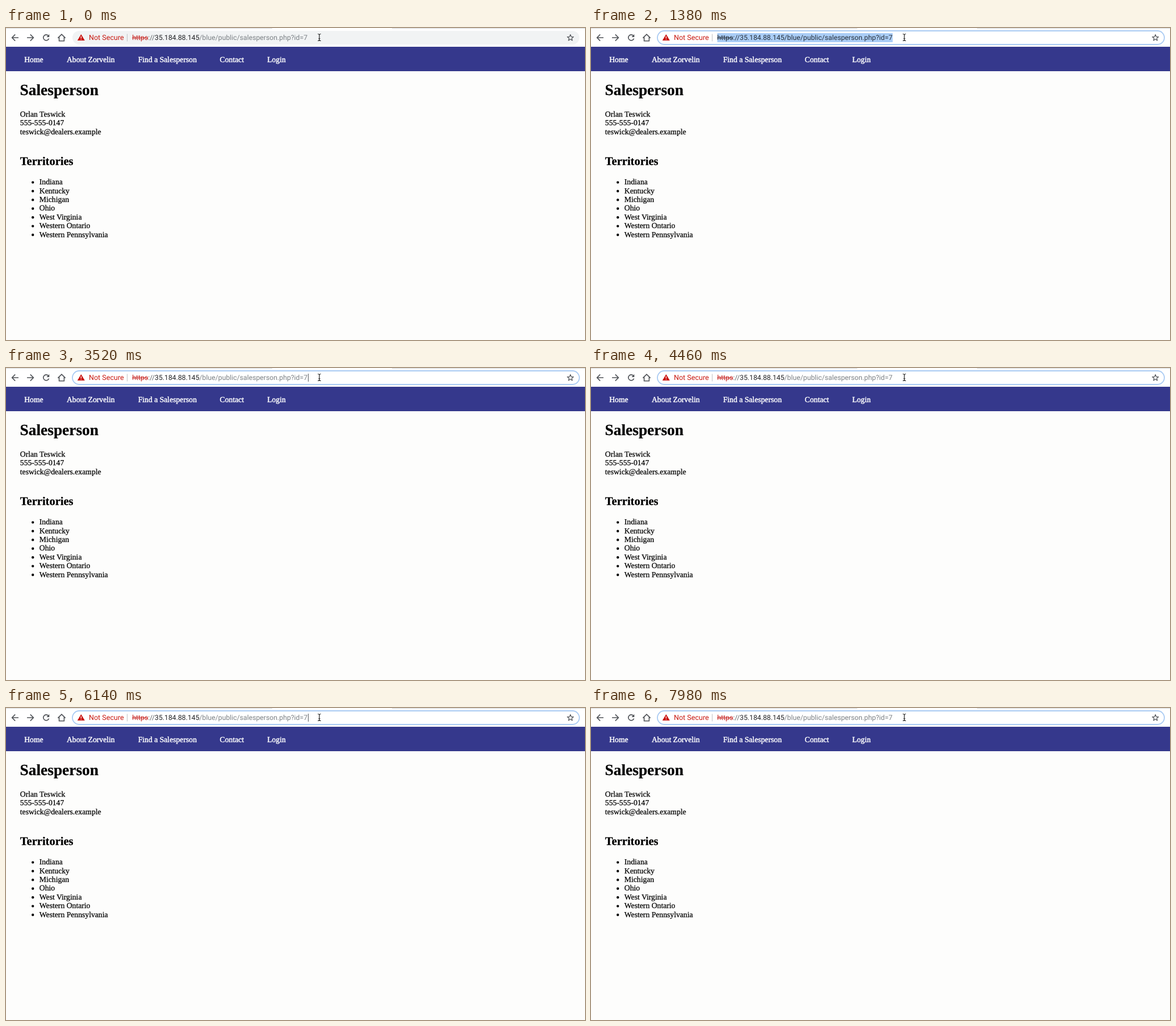
These frames come from a looping animation (1020x549 px, 8 s). An HTML page:

```html
<!DOCTYPE html>
<html lang="en">
<head>
<meta charset="utf-8">
<title>Salesperson</title>
<style>
  html, body { margin: 0; width: 100%; height: 100%; overflow: hidden; background: #fdfdfc; }
  svg { display: block; width: 1020px; height: 549px; text-rendering: geometricPrecision; }
  .page { font: 13.68px "Liberation Serif", "Times New Roman", serif; }
  .page text { stroke: #000; stroke-width: .25; }
  .page .title { font-size: 27.36px; font-weight: bold; }
  .page .subtitle { font-size: 20.52px; font-weight: bold; }
  .page .nav { fill: #fff; stroke: #fff; stroke-width: .45; }
  .bar { font: 12.26px Roboto, "Open Sans", sans-serif; }
  .icon { fill: none; stroke: #505358; stroke-width: 1.6; }
  .scheme { fill: #c5221f; text-decoration: line-through; }
  .slashes { fill: #5f6368; }
  .host { fill: #202124; }
  .path { fill: #7b8085; }
  .selected tspan { fill: #27303b; }
</style>
</head>
<body>
<svg viewBox="0 0 1020 549">
  <rect width="1020" height="549" fill="#fdfdfc"/>
  <g class="bar">
    <rect width="1020" height="33" fill="#fff"/>
    <path d="M0 .5H469M680 .5H1020" stroke="#d6d8db"/>
    <g class="icon">
      <path d="M22 17H11M16.2 11.4L10.6 17L16.2 22.6"/>
      <path d="M37 17H48M42.8 11.4L48.4 17L42.8 22.6"/>
      <path d="M74.6 13.6A5 5 0 1 0 75.6 18.4"/>
      <path d="M76.3 11V16H71.3Z" fill="#505358" stroke="none"/>
      <path d="M91.4 17.6L98 11.2L104.6 17.6M93.6 16V22.8H102.4V16"/>
    </g>
    <rect id="pill" x="117" y="5" width="893" height="24" rx="12"/>
    <path d="M132.3 11L138.8 22H125.8Z" fill="#c80d08"/>
    <path d="M132.3 14.4V18.2M132.3 19.4V20.8" stroke="#fff" stroke-width="1.3"/>
    <text x="146" y="21.2" font-size="12.55" fill="#c91a12">Not Secure</text>
    <path d="M213.5 10.5V23.5" stroke="#bfc1c4"/>
    <rect id="selection" x="222.5" y="9" width="309" height="16" fill="#aacdf6"/>
    <text id="url" x="222.3" y="21.2"><tspan class="scheme">https</tspan><tspan class="slashes">://</tspan><tspan class="host">35.184.88.145</tspan><tspan class="path">/blue/public/salesperson.php?id=7</tspan></text>
    <path id="caret" d="M532.5 10V24" stroke="#55585c"/>
    <path d="M549.3 10.5Q552 10.5 552 12.5Q552 10.5 554.7 10.5M552 12V21M549.3 22.5Q552 22.5 552 20.5Q552 22.5 554.7 22.5M550.5 18.5H553.5" fill="none" stroke="#222" stroke-width="1.2"/>
    <path id="star" class="icon" stroke-linejoin="round" style="stroke-width:1.2"/>
  </g>
  <g class="page" id="page">
    <rect y="33" width="1020" height="43" fill="#35388c"/>
  </g>
</svg>
<script>
const LOOP = 8000, FOCUS = 700, DESELECT = 3380, BLINK = 583;
const byId = id => document.getElementById(id);
const page = byId("page"), pill = byId("pill"), url = byId("url");

function add(tag, attrs, content = "") {
  const node = document.createElementNS("http://www.w3.org/2000/svg", tag);
  for (const key in attrs) node.setAttribute(key, attrs[key]);
  node.textContent = content;
  page.append(node);
}
const label = (x, y, content, style = "") => add("text", { x, y, class: style }, content);

[[32.2, "Home"], [107, "About Zorvelin"], [232.7, "Find a Salesperson"], [376.6, "Contact"], [460.2, "Login"]]
  .forEach(([x, name]) => label(x, 59.6, name, "nav"));

label(24.6, 118, "Salesperson", "title");
["Orlan Teswick", "555-555-0147", "teswick@dealers.example"]
  .forEach((line, i) => label(24.8, 155.8 + i * 15.4, line));

label(24.8, 241, "Territories", "subtitle");
["Indiana", "Kentucky", "Michigan", "Ohio", "West Virginia", "Western Ontario", "Western Pennsylvania"]
  .forEach((name, i) => {
    const y = 275.2 + i * 15.4;
    add("circle", { cx: 47.2, cy: y - 3.6, r: 2.2 });
    label(58.8, y, name);
  });

const starPoints = Array.from({ length: 10 }, (_, i) => {
  const radius = i % 2 ? 2.5 : 5.8, angle = i * Math.PI / 5;
  return `${994.3 + radius * Math.sin(angle)} ${17.3 - radius * Math.cos(angle)}`;
});
byId("star").setAttribute("d", `M${starPoints.join("L")}Z`);

const show = (id, visible) => byId(id).setAttribute("visibility", visible ? "visible" : "hidden");

function render(t) {
  const focused = t >= FOCUS, selected = focused && t < DESELECT;
  pill.setAttribute("fill", focused ? "#fff" : "#f1f3f4");
  pill.setAttribute("stroke", focused ? "#aacbf3" : "none");
  pill.setAttribute("stroke-width", 1.8);
  url.setAttribute("class", selected ? "selected" : "");
  show("selection", selected);
  show("caret", t >= DESELECT && Math.floor((t - DESELECT) / BLINK) % 2 === 0);
}

const start = performance.now();
function tick() {
  render((performance.now() - start) % LOOP);
  requestAnimationFrame(tick);
}
tick();
</script>
</body>
</html>
```
